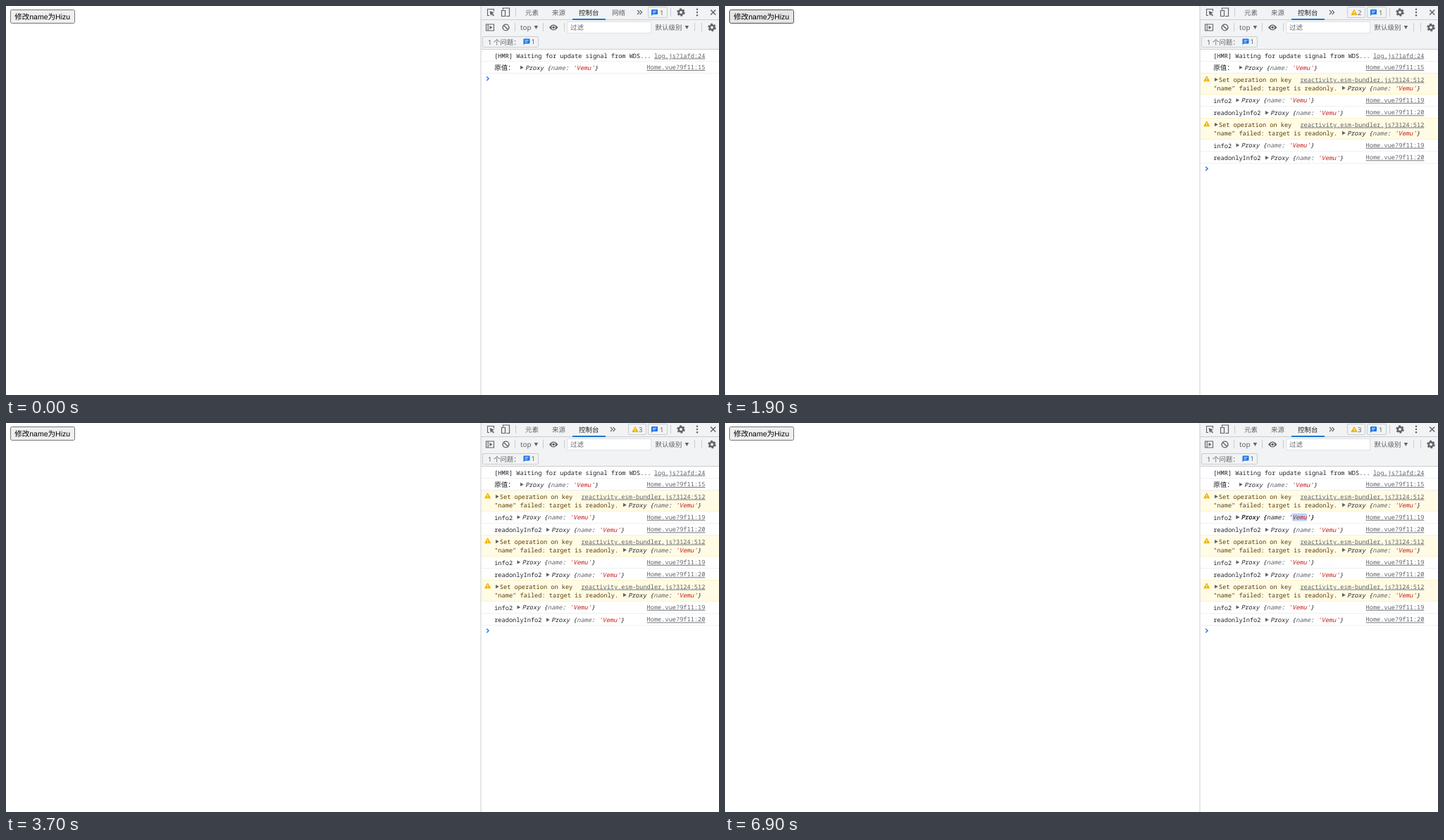
These frames come from a looping animation (1012 px wide and 553 px high, 8 s). An HTML page:

```html
<!DOCTYPE html>
<html lang="zh">
<head>
<meta charset="utf-8">
<title>Readonly proxy demo</title>
<style>
html, body { margin: 0; width: 100%; height: 100%; overflow: hidden; background: #fff; }
svg { display: block; width: 1012px; height: 553px; }
text { text-rendering: geometricPrecision; white-space: pre; }
.ui { font: 9.48px "Noto Sans CJK SC", "Noto Sans CJK", "Noto Sans", sans-serif; fill: #5f6368; }
.latin { font-family: "Noto Sans", sans-serif; }
.btn { font: 10.53px "Liberation Sans", "Noto Sans CJK SC", sans-serif; }
.mono { font: 8.64px "Noto Sans Mono", "Noto Sans CJK SC", monospace; fill: #202124; }
.link { text-anchor: end; text-decoration: underline; fill: #5f6368; }
.link.hover { fill: #202124; }
.warn { fill: #5c3c00; }
.obj { font-style: italic; }
.key { fill: #5f6368; }
.str { fill: #c41a16; }
</style>
</head>
<body>
<svg id="stage" viewBox="0 0 1012 553"></svg>
<script>
const LOOP = 8000, BLOCK = 64.1, CHAR = 5.184;
const GREY = '#5f6368', BLUE = '#1a73e8', AMBER = '#f0b400';

const text = (x, y, str, cls, extra = '') => `<text x="${x}" y="${y}" class="${cls}" ${extra}>${str}</text>`;
const rect = (x, y, w, h, fill, extra = '') => `<rect x="${x}" y="${y}" width="${w}" height="${h}" fill="${fill}" ${extra}/>`;
const fillPath = (d, color = GREY) => `<path d="${d}" fill="${color}"/>`;
const linePath = (d, color = GREY, width = 1.2) => `<path d="${d}" fill="none" stroke="${color}" stroke-width="${width}"/>`;
const group = (id, body, extra = '') => `<g id="${id}" ${extra}>${body}</g>`;

const divider = (x, y) => rect(x, y - 6, 1, 12, '#cacdd1');
const box = (x, y, w) => rect(x + .5, y + .5, w, 15, '#f1f3f4', 'stroke="#cacdd1" rx="1.5"');
const down = (x, y) => fillPath(`M${x} ${y}h5.4l-2.7 5z`);
const right = (x, y) => fillPath(`M${x} ${y - 2.7}l4.8 2.7l-4.8 2.7z`);
const chat = (x, y) => fillPath(`M${x + 1} ${y}h7q1 0 1 1v5q0 1-1 1h-6l-2 2v-8q0-1 1-1z`, BLUE)
  + linePath(`M${x + 2} ${y + 2.4}h5M${x + 2} ${y + 4.6}h3.5`, '#fff', .9);
const alertIcon = (x, y) => `<path d="M${x} ${y + 7.5}l4-7l4 7z" fill="${AMBER}" stroke="${AMBER}" stroke-linejoin="round"/>`
  + linePath(`M${x + 4} ${y + 2.6}v2.7M${x + 4} ${y + 6.1}v1`, '#fff', 1);
const gear = (x, y) => `<g fill="none" stroke="${GREY}"><circle cx="${x}" cy="${y}" r="3.2" stroke-width="2.4"/>
  <circle cx="${x}" cy="${y}" r="4.9" stroke-width="1.7" stroke-dasharray="2.8 2.33"/></g>`;

const link = (y, str, id = '') => text(992.4, y, str, 'mono link', id && `id="${id}"`);
const proxy = (x, y) => right(x - 7, y - 3.3) + text(x, y,
  `Proxy {<tspan class="key">name</tspan>: <tspan class="str">'Vemu'</tspan>}`, 'mono obj');
const rule = (y, color = '#f0f0f0') => rect(675, y, 337, 1, color);

function toolbar() {
  return rect(674, 0, 338, 62, '#f1f3f4') + rect(674, 19, 338, 1, '#cacdd1') + rule(61, '#cacdd1')
    // tab strip
    + linePath('M686 13.5h-2.5v-9h9v3', GREY, 1.1) + fillPath('M686.5 7l6.5 2.6l-2.7 1l2.7 2.7l-1.2 1.2l-2.7-2.7l-1 2.4z')
    + linePath('M705.5 5.5v-2.5h9v11.5h-4.5M703.5 6.5h5v8h-5z', GREY, 1.2)
    + divider(723, 9)
    + text(737, 13, '元素', 'ui') + text(775, 13, '来源', 'ui')
    + text(813, 13, '控制台', 'ui', 'style="fill:#202124"')
    + rect(804, 18, 47, 2, '#1976d2')
    + group('networkTab', text(860, 13, '网络', 'ui'))
    + group('more', linePath('M896 6l3 3l-3 3M899.6 6l3 3l-3 3', GREY, 1.1))
    + group('warnBadge', box(883, 1, 25) + alertIcon(889, 5) + text(898, 12.6, '<tspan id="warnCount">1</tspan>', 'ui latin'))
    + box(911, 1, 27) + chat(916, 5) + text(928, 12.6, '1', 'ui latin')
    + divider(943, 9) + gear(958, 9)
    + [4.8, 9, 13.2].map(y => `<circle cx="981" cy="${y}" r="1.2" fill="${GREY}"/>`).join('')
    + linePath('M1000.2 5.5l7 7m0-7l-7 7', GREY, 1.5)
    // filter strip
    + linePath('M681.5 26h11v9h-11zM684.2 26v9', GREY, 1.1) + fillPath('M686.5 28l4 2.5l-4 2.5z')
    + `<circle cx="709.5" cy="30.5" r="4.4" fill="none" stroke="${GREY}" stroke-width="1.4"/>` + linePath('M706.4 27.4l6.2 6.2', GREY, 1.4)
    + divider(722, 30)
    + text(730, 33.8, 'top', 'ui latin', 'style="font-size:9.9px"') + down(749.7, 28)
    + divider(762, 30)
    + fillPath('M771 30.5q6-8 12.4 0q-6.4 8-12.4 0z') + '<circle cx="777.2" cy="30.5" r="2.3" fill="#5f6368" stroke="#f1f3f4" stroke-width="1.1"/>'
    + divider(792, 30)
    + rect(797, 22.5, 118.5, 16, '#fff', 'stroke="#dfe1e5"') + text(801, 34.3, '过滤', 'ui')
    + text(921.5, 34, '默认级别', 'ui') + down(963.7, 28)
    + divider(977, 30) + divider(987, 30) + gear(1002, 30.5)
    // issues strip
    + box(676, 43, 79) + text(684, 54.6, '<tspan class="latin">1 </tspan>个问题：', 'ui')
    + chat(734.5, 46.5) + text(745.5, 54.4, '1', 'ui latin');
}

function logBlock(i) {
  return group('log' + i,
    rect(675, 95, 337, 31, '#fffbe5') + rule(95, '#fff5c2') + rule(125, '#fff5c2')
    + alertIcon(679.7, 99.3) + right(695, 104.6)
    + text(700.8, 108, 'Set operation on key', 'mono warn')
    + link(107.6, 'reactivity.esm-bundler.js?3124:512', 'bundleLink' + i)
    + text(693.2, 120.4, '"name" failed: target is readonly.', 'mono warn') + proxy(883, 119.8)
    + text(693.2, 137.5, 'info2', 'mono') + proxy(732.5, 137.2) + link(136.8, 'Home.vue?9f11:19')
    + rule(142)
    + text(693.2, 155.4, 'readonlyInfo2', 'mono') + proxy(774, 155) + link(154.4, 'Home.vue?9f11:20')
    + rule(159),
    `transform="translate(0 ${Math.round(i * BLOCK)})"`);
}

document.getElementById('stage').innerHTML =
  rect(6.5, 5.5, 91, 19, '#efefef', 'id="button" rx="2"')
  + text(12.2, 19, '修改name为Hizu', 'btn')
  + rect(674, 62, 338, 491, '#fff')
  + toolbar()
  + text(693.2, 73.8, '[HMR] Waiting for update signal from WDS...', 'mono') + link(73.6, 'log.js?1afd:24') + rule(78)
  + [0, 1, 2].map(logBlock).join('')
  + rect(0, 0, 0, 11, '#b8d6fb', 'id="selection"')
  + text(693.2, 90.7, '原值：', 'mono', 'style="font-size:9.48px"') + proxy(737, 90.7) + link(90, 'Home.vue?9f11:15') + rule(95)
  + group('selectedRow', proxy(732.5, 137.2))
  + group('prompt', linePath('M682.2 100.5l2.9 2.7l-2.9 2.7', BLUE, 1.3))
  + rect(673.5, 0, 1, 553, '#cacdd1');

const $ = id => document.getElementById(id);
const FACES = { idle: ['#efefef', '#767676'], hover: ['#e5e5e5', '#4f4f4f'], press: ['#f5f5f5', '#8d8d8d'] };

// each track: [start ms, value]
const tracks = {
  face: [[0, 'idle'], [900, 'hover'], [1700, 'press'], [1800, 'hover'], [2300, 'idle'],
    [3000, 'hover'], [3100, 'press'], [3300, 'hover'], [3700, 'idle']],
  warnings: [[0, 0], [1400, 1], [1800, 2], [3400, 3]],
  logs: [[0, 0], [1500, 1], [1900, 2], [3500, 3]],
  hoverLink: [[0, -1], [4900, 1], [5000, -1], [6300, 0], [6400, -1]],
  // selection: row, first letter, letter count
  selection: [[0, null], [6100, [0, 0, 2]], [6200, [0, 0, 3]], [6700, null], [6800, [1, 2, 2]], [6900, [1, 0, 4]]],
};
const valueAt = (track, t) => track.findLast(([start]) => start <= t)[1];
const show = (id, on) => $(id).setAttribute('visibility', on ? 'visible' : 'hidden');

function render(t) {
  const s = Object.fromEntries(Object.entries(tracks).map(([k, track]) => [k, valueAt(track, t)]));
  const [fill, stroke] = FACES[s.face];
  $('button').setAttribute('fill', fill);
  $('button').setAttribute('stroke', stroke);

  show('networkTab', !s.warnings);
  show('warnBadge', s.warnings);
  $('warnCount').textContent = s.warnings || 1;
  $('more').setAttribute('transform', `translate(${s.warnings ? -38 : 0} 0)`);

  for (let i = 0; i < 3; i++) {
    show('log' + i, i < s.logs);
    $('bundleLink' + i).classList.toggle('hover', s.hoverLink === i);
  }
  $('prompt').setAttribute('transform', `translate(0 ${Math.round(s.logs * BLOCK)})`);

  show('selection', s.selection);
  show('selectedRow', s.selection && s.selection[0] === 1);
  if (s.selection) {
    const [row, first, count] = s.selection;
    $('selection').setAttribute('x', (row ? 805.1 : 809.6) + first * CHAR);
    $('selection').setAttribute('y', row ? 128.5 : 82);
    $('selection').setAttribute('width', count * CHAR);
  }
}

function tick() {
  render(performance.now() % LOOP);
  requestAnimationFrame(tick);
}
tick();
</script>
</body>
</html>
```
